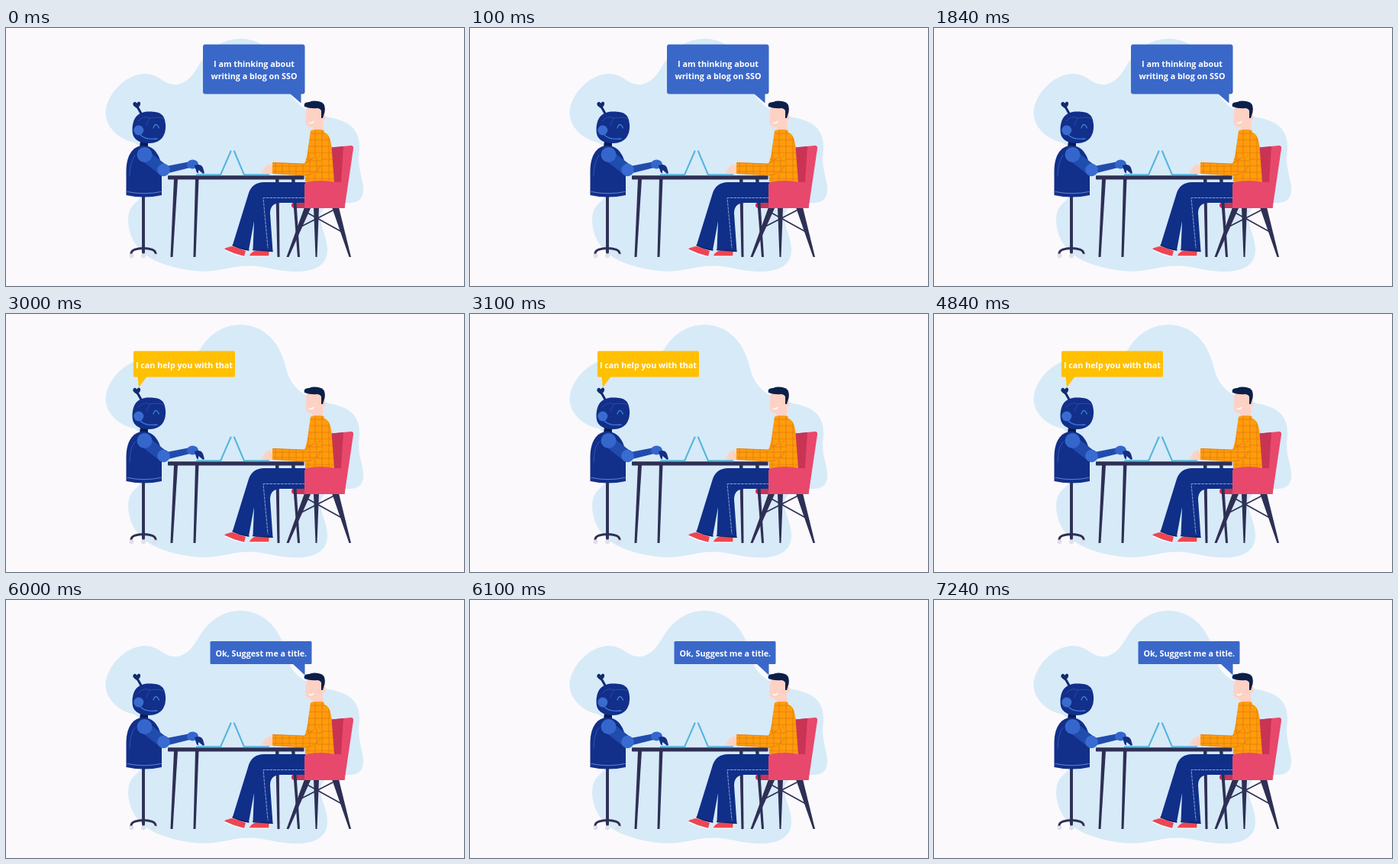
Write an HTML page that moves like this. It is 600 px wide and 338 px high and loops after 8 s.

```html
<!DOCTYPE html>
<html lang="en">
<head>
<meta charset="utf-8">
<title>Chat at the desk</title>
<style>
  html, body { margin: 0; width: 100%; height: 100%; overflow: hidden; background: #fbf9fc; }
  svg { display: block; width: 100%; height: 100%; }
  text { font: 700 10.75px "Open Sans", "Noto Sans", sans-serif; fill: #fff; text-anchor: middle; }
  .line { fill: none; stroke-linecap: round; stroke-linejoin: round; }
  .dark { stroke: #2e2f55; }
  .say { visibility: hidden; animation: 8s step-end infinite; }
  .ask { animation-name: ask; }
  .offer { animation-name: offer; }
  .accept { animation-name: accept; }
  @keyframes ask { 0% { visibility: visible; } 37.5%, 100% { visibility: hidden; } }
  @keyframes offer { 0% { visibility: hidden; } 37.5% { visibility: visible; } 75%, 100% { visibility: hidden; } }
  @keyframes accept { 0% { visibility: hidden; } 75%, 100% { visibility: visible; } }
</style>
</head>
<body>
<svg viewBox="0 0 600 338">
  <defs>
    <pattern id="check" width="9" height="8.5" patternUnits="userSpaceOnUse" patternTransform="translate(394 137)">
      <rect width="9" height="8.5" fill="#ff9c0c"/>
      <path d="M0 1H9M2 0V8.5" stroke="#e07a08" stroke-width=".8"/>
    </pattern>
    <pattern id="sleeve" width="9" height="7" patternUnits="userSpaceOnUse" patternTransform="translate(349 179)">
      <rect width="9" height="7" fill="#ff9c0c"/>
      <path d="M0 2H9M4 0V7" stroke="#e07a08" stroke-width=".8"/>
    </pattern>
  </defs>
  <rect width="600" height="338" fill="#fbf9fc"/>

  <path fill="#d7eaf8" d="M308 14C341 15 360 41 366 68C371 91 383 103 401 110C419 118 434 117 447 125C461 133 464.500 147 462.500 165C460 184 469 199 468 214C467 226 458 230 445 229C425 229 411 236 412 250C413 264 421 274 421 291C421 310 405 319 382 319C350 319 335 309 308 312C286 315 270 321 246 318C217 314 190 307 174 289C162 275 158 256 161 243C164 228 180 226 185 207C189 187 186 161 168 150C148 146 130 130 130.500 110C132 88 155 61 181 60C202 60 207 76 224 74C242 71 248 55 257 42C269 24 288 14 308 14Z"/>

  <!-- robot -->
  <g>
    <path class="line dark" d="M180 220V294" stroke-width="3.900"/>
    <path class="line dark" d="M164 295.500C164 286 196 286 196 295.500" stroke-width="3"/>
    <g fill="#dfe0e8">
      <circle cx="164.500" cy="298.500" r="3"/><circle cx="180" cy="298.500" r="3"/><circle cx="194.500" cy="298.500" r="3"/>
    </g>
    <path d="M176 148H186V157H175Z" fill="#0b1a52"/>
    <path d="M157.500 219V188C157.500 168 165 155 179 154C193 153 203.500 167 204 186V219Q181 224 157.500 219Z" fill="#122f8a"/>
    <path class="line" d="M159 214.500Q181 219 203 214.500" stroke="#6d8ed8" stroke-width=".9"/>
    <path class="line" d="M169 167Q162 176 162 194" stroke="#3560bd" stroke-width=".8"/>
    <path class="line" d="M172 103L177 112" stroke="#122a70" stroke-width="3"/>
    <path d="M172 105.500Q165 101.500 166.500 98.500Q168.500 95 171.500 98.500Q174 95 176 98Q177 101 172 105.500Z" fill="#122a70"/>
    <path d="M165.500 133C166 117 173 109.500 188 109.500C202 109.500 208 113 209 126C210 141 203 150.500 188 151C173 151 165 145 165.500 133Z" fill="#122f8a"/>
    <path class="line" d="M173 122Q181 114 189 118Q186 120 184 128M189 118Q199 116 207 119" stroke="#2c55b3" stroke-width=".8"/>
    <circle cx="173.800" cy="134" r="6.500" fill="#3a6bd0"/>
    <path class="line" d="M176 140Q183 147 198 145M193 131Q196 122 200.500 131" stroke="#3f7bd9" stroke-width="1.300"/>
    <path class="line" d="M183 168L206 186" stroke="#204cad" stroke-width="15"/>
    <circle cx="181.500" cy="166" r="10" fill="#3566cc"/>
    <path d="M205 182L241 175V183L209 191Z" fill="#204cad"/>
    <circle cx="206.500" cy="186" r="8.300" fill="#3a6bd0"/>
    <ellipse cx="244.500" cy="178.500" rx="7.500" ry="6" fill="#3566cc"/>
    <path d="M247 180Q255 177 258 183L260 190Q258 192 256 189L252 186L252 190Q250 191 249 187Z" fill="#142f83"/>
  </g>

  <!-- chair -->
  <path class="line dark" d="M391 240L438 266M428 239L383 262" stroke-width="1.700"/>
  <g fill="#2e2f55">
    <path d="M391 235H399.500L370.500 300H367.500Z"/>
    <path d="M403 235H410L407.500 300H405.500Z"/>
    <path d="M427 235H436L452 300H449.500Z"/>
  </g>
  <path d="M427 156.500L452 154Q455.500 154 455 158L443.500 236H426Z" fill="#e8486c"/>
  <path d="M426 156.500L442 155L439 202H426Z" fill="#c93454"/>
  <path d="M394 228.500H378Q374 228.500 374 232Q374 236 378 236H394Z" fill="#c93454"/>

  <!-- table -->
  <g fill="#2e2f55">
    <path d="M220 198H225L218.500 300H215.500Z"/>
    <path d="M248 198H252.500L248.500 300H245.500Z"/>
    <path d="M353 198H357.500L358.500 300H355.500Z"/>
    <path d="M374 198H378.500L385 300H382Z"/>
    <rect x="212" y="193.300" width="178.500" height="5.300" rx=".8"/>
  </g>

  <!-- man -->
  <path d="M297 286L314 292L312 299Q299 296 286 289.500Q289 287 297 286Z" fill="#ee4551"/>
  <path d="M328 291H345L344 298.500H319Q320 294 328 291Z" fill="#ee4551"/>
  <path class="line" d="M287 291.500Q299 297.500 312 299.500M320 299.300H343" stroke="#fff" stroke-width="1"/>
  <path d="M394 202H338Q323 202 318 216L297 284Q306 289 318 291L325 253L323.500 290L349.500 292.500L346 243Q346 229 360 229H394Z" fill="#102f88"/>
  <path class="line" d="M297 284.500Q306 289 318 291M323.500 290.500L349 292.500" stroke="#0b2268" stroke-width="1.500"/>
  <path class="line" d="M392 222.500H337L343 288" stroke="#a9bce5" stroke-width=".8" stroke-dasharray="3 1.800"/>
  <path d="M394 103H415.500V136H401L400.500 130Q392.500 130 392 121Z" fill="#fdd2c5"/>
  <ellipse cx="416" cy="117" rx="2.500" ry="4" fill="#fdd2c5"/>
  <path class="line" d="M397.500 123.500Q400 126 403 122.500" stroke="#fff" stroke-width="1.500"/>
  <path d="M391 103Q389 97 397 97Q405 94 414 97.500Q419 101 417.500 110L415 118H413V111Q414 106 408 105Q399 106 391 103Z" fill="#0b1f4b"/>
  <path d="M399 134.500Q408 132 416.500 134L417 137Q425 139 426.500 156L430 202L392 203L391 178Q395 168 396.500 152Z" fill="url(#check)"/>
  <path d="M349 176L391 178L411 166Q417 178 410 188Q404 193 392 193L349 190.500Z" fill="url(#sleeve)"/>
  <path class="line" d="M350 190.500L391 193Q408 192 412 180M350 176.500L391 178L403 170" stroke="#e07a08" stroke-width=".8"/>
  <path d="M349 179Q342 178 338 184L334 190Q340 189 341 191.500H349Z" fill="#fdd2c5"/>
  <path d="M394 202Q411 198 431 202L446 204L443.500 236H391V206Q391 203 394 202Z" fill="#e8486c"/>

  <!-- laptops -->
  <path class="line" d="M250 192.300H281L294.500 161.500M344 192.300H312L299 161.500" stroke="#55b5df" stroke-width="2.100"/>

  <!-- speech -->
  <g class="say ask">
    <rect x="258" y="21.500" width="133.500" height="65" rx="3" fill="#3a68c9"/>
    <path d="M372 86L386.500 98.500V86Z" fill="#3a68c9"/>
    <text x="325" y="50.500">I am thinking about</text>
    <text x="325" y="67.300">writing a blog on SSO</text>
  </g>
  <g class="say offer">
    <rect x="167" y="48.500" width="133" height="34" rx="1.500" fill="#ffc000"/>
    <path d="M172.500 82L174 96L184.500 82Z" fill="#ffc000"/>
    <text x="233.500" y="70.500">I can help you with that</text>
  </g>
  <g class="say accept">
    <rect x="267.500" y="54" width="133" height="30" rx="1.500" fill="#3a68c9"/>
    <path d="M376 84L391.500 98.500V84Z" fill="#3a68c9"/>
    <text x="334.300" y="73.700">Ok, Suggest me a title.</text>
  </g>
</svg>
</body>
</html>
```
